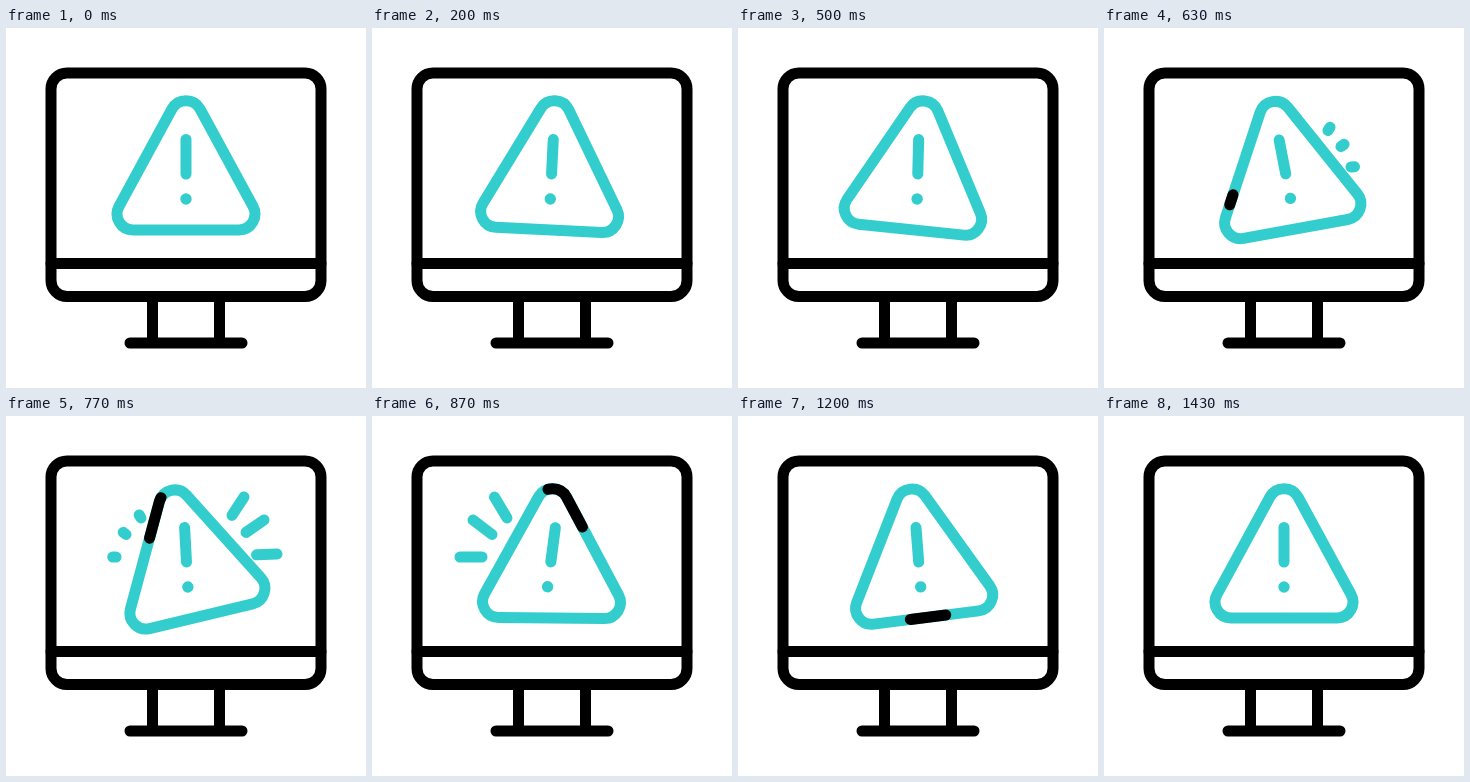
Animation of 360x360 px, one loop 1.67 s. Source, as an HTML page:

```html
<!DOCTYPE html>
<html lang="en">
<head>
<meta charset="utf-8">
<title>Monitor warning</title>
<style>
  html, body { margin: 0; width: 100%; height: 100%; overflow: hidden; background: #fff; }
  svg { display: block; width: 100vw; height: 100vh; }
  .ink, .teal { fill: none; stroke-width: 11; stroke-linecap: round; stroke-linejoin: round; }
  .ink { stroke: #000; }
  .teal { stroke: #33cdcd; }
</style>
</head>
<body>
<svg viewBox="0 0 360 360">
  <g class="ink">
    <rect x="45" y="45" width="270" height="223.5" rx="16"/>
    <path d="M45 235.5H315M146.5 268.5V315M213.5 268.5V315M124 315H236"/>
  </g>
  <g id="sparks" class="teal"></g>
  <g id="sign">
    <path id="edge" class="teal" d="M113 178.4L166 80.9A16 16 0 0 1 194 80.9L247 178.4A16 16 0 0 1 233 202H127A16 16 0 0 1 113 178.4Z"/>
    <path id="runner" class="ink"/>
  </g>
  <g id="mark">
    <path class="teal" d="M180 111.5V146"/>
    <circle cx="180" cy="171" r="5.7" fill="#33cdcd"/>
  </g>
</svg>
<script>
const LOOP = 1670, STEP = 1000 / 30;
const $ = id => document.getElementById(id);
const sign = $('sign'), mark = $('mark'), runner = $('runner');
runner.setAttribute('d', $('edge').getAttribute('d'));

// [time in steps, angle in degrees]
const signKeys = [[4, 0], [11, 15], [21.8, -15], [30, 15], [38, -11], [43, 0]];
const markKeys = [[4, 0], [11, 15], [18.8, -11], [30.2, 15.4], [31.5, 15.4], [38, -10], [43, 0]];

// rays as inner end, outer end, start step
const rays = [
  [224, 102.5, 238, 81, 18], [237, 118.5, 258, 104, 18], [247, 139, 271, 138, 18],
  [135, 102, 122.5, 81, 22], [120, 118.5, 101, 104, 22], [110, 141, 88, 141, 22]
].map(ray => {
  const el = document.createElementNS('http://www.w3.org/2000/svg', 'path');
  $('sparks').append(el);
  return { el, ray };
});

const clamp = v => Math.min(1, Math.max(0, v));
const ease = v => (1 - Math.cos(Math.PI * clamp(v))) / 2;

function swing(keys, f) {
  let angle = keys[0][1];
  for (let i = 1; i < keys.length; i++) {
    const [t0, a] = keys[i - 1], [t1, b] = keys[i];
    angle += (b - a) * ease((f - t0) / (t1 - t0));
  }
  return angle;
}

function turn(el, angle) {
  el.setAttribute('transform', `rotate(${angle.toFixed(3)} 180 137)`);
}

function show(el, on) {
  el.style.display = on ? '' : 'none';
}

function drawRunner(f) {
  const p = (f - 18) / 22, on = p > 0 && p < 1;
  show(runner, on);
  if (!on) return;
  const half = 120 * p * (1 - p), mid = 415 * p;
  runner.setAttribute('stroke-dasharray', `${2 * half} 999`);
  runner.setAttribute('stroke-dashoffset', half - mid);
}

function drawRay({ el, ray: [x0, y0, x1, y1, start] }, f) {
  const head = ease((f - start) / 4), tail = ease((f - start - 4) / 4);
  show(el, head > tail);
  const at = k => `${x0 + (x1 - x0) * k} ${y0 + (y1 - y0) * k}`;
  el.setAttribute('d', `M${at(tail)}L${at(head)}`);
}

function draw(ms) {
  const f = Math.floor((ms % LOOP + 5) / STEP);
  turn(sign, swing(signKeys, f));
  turn(mark, swing(markKeys, f));
  drawRunner(f);
  rays.forEach(r => drawRay(r, f));
}

const begin = performance.now();
function tick() {
  draw(performance.now() - begin);
  requestAnimationFrame(tick);
}
tick();
</script>
</body>
</html>
```
